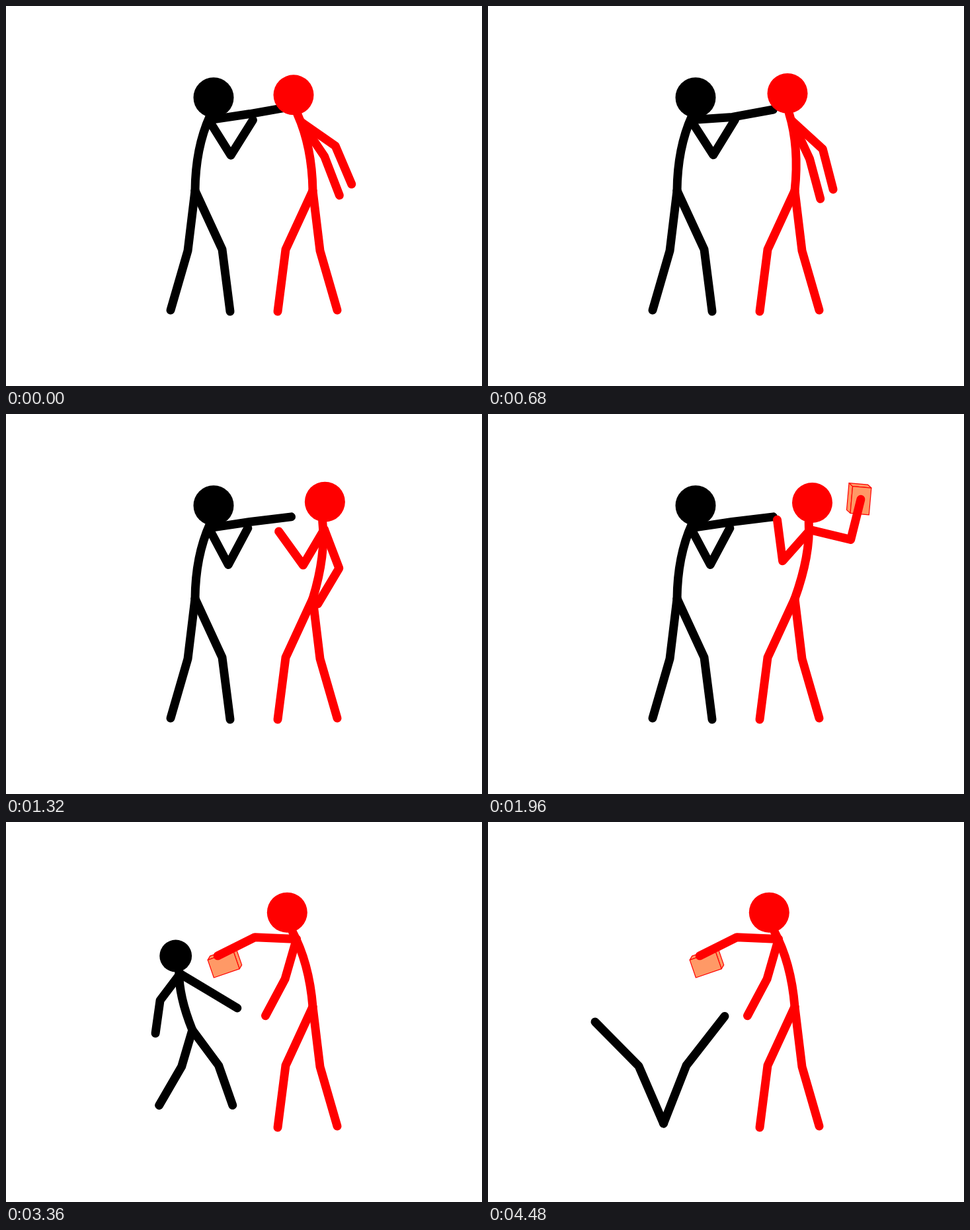
Animation, 720 px wide and 576 px high, one loop 4800 ms. Source, as an HTML page with a canvas:

```html
<!DOCTYPE html>
<html lang="en">
<head>
<meta charset="utf-8">
<title>Stick fight</title>
<style>
  html, body { margin: 0; width: 100%; height: 100%; overflow: hidden; background: #fff; }
  canvas { display: block; }
</style>
</head>
<body>
<canvas id="stage" width="720" height="576"></canvas>
<script>
const ctx = document.getElementById('stage').getContext('2d');
const LOOP = 4800, STEP = 40, PUNCH = 240, LIMB = 63;
const clamp = x => Math.min(1, Math.max(0, x));
const wave = x => (1 - Math.cos(Math.PI * x)) / 2;
const ease = (t, start, length) => wave(clamp((t - start) / length));
const lerp = (a, b, u) => a + (b - a) * u;
const mix = (a, b, u) => a.map((v, i) => lerp(v, b[i], u));
const polar = (x, y, deg, len) => {
  const a = deg * Math.PI / 180;
  return [x + len * Math.cos(a), y + len * Math.sin(a)];
};

// A pose is the lean of the head, then upper and lower angles of the two arms
const PUNCH_A = [28, -8.5, -10, 58, -58];
const PUNCH_B = [28, 62, -62, -8.5, -7];
const KNOCKED = [-31.5, 127, -262, 31, 31];
const STRUCK = [-29, 56, 69, 35, 67];
const REELING = [7, 74, 81, 50, 84];
const GUARD = [26.5, 131.6, 262.6, 75, 130];
const REACH = [...GUARD.slice(0, 3), 57, 89];
const RAISE = [...GUARD.slice(0, 3), 13.5, -76];
const STRIKE = [-38.7, 106, 118, 182.6, -206.6];

// Leg points relative to the hip: knee and foot behind, knee and foot in front
const STANCE = [[-11, 91], [-37, 181], [41, 89], [53, 183]];
const FALLEN = [[-37.5, -87], [-103.5, -154], [34.5, -88], [92.5, -162.5]];

function path(points) {
  ctx.beginPath();
  points.forEach(p => ctx.lineTo(...p));
}

function arm([x, y], upper, lower, size = 1) {
  const elbow = polar(x, y, upper, LIMB * size);
  return [[x, y], elbow, polar(...elbow, lower, LIMB * size)];
}

// facing is 1 to the right and -1 to the left; the spine bows away from that side
function makeBody(hip, facing, lean, size = 1) {
  const height = 146 - 2 * facing;
  const at = (x, y) => [hip[0] + x * size, hip[1] + y * size];
  const top = -Math.sqrt(height ** 2 - lean ** 2);
  const bend = 0.45 * lean - 12 * facing, middle = -0.45 * height;
  return {
    head: at(lean, top),
    neck: at(0.8 * lean, 0.8 * top),
    spine: at(bend, middle),
    shoulder: at(0.664 * lean + 0.16 * bend + 2, 0.664 * top + 0.16 * middle - 3 * facing)
  };
}

function drawFigure(color, hip, facing, legs, [lean, a1, a2, b1, b2], size = 1) {
  ctx.strokeStyle = ctx.fillStyle = color;
  ctx.lineWidth = 13;
  ctx.lineCap = ctx.lineJoin = 'round';
  const points = legs.map(([x, y]) => [hip[0] + x * facing, hip[1] + y]);
  for (const leg of [points.slice(0, 2), points.slice(2)]) {
    path([hip, ...leg]);
    ctx.stroke();
  }
  if (!size) return;
  const { head, neck, spine, shoulder } = makeBody(hip, facing, lean, size);
  path([neck]);
  ctx.quadraticCurveTo(...spine, ...hip);
  ctx.stroke();
  for (const limb of [arm(shoulder, a1, a2, size), arm(shoulder, b1, b2, size)]) {
    path(limb);
    ctx.stroke();
  }
  ctx.beginPath();
  ctx.arc(...head, 30.5 * size, 0, 2 * Math.PI);
  ctx.fill();
}

// The brick turns with the forearm and slips in the grip during the blow
function drawBrick([handX, handY], forearm, blow) {
  const x = handX + 9 * blow, y = handY + 2 + 11 * blow;
  const dx = lerp(-5.5, 3.5, blow), dy = lerp(-5, -6, blow);
  const angle = forearm + lerp(-9, 7.6, blow);
  const corners = [[-1, -1], [1, -1], [1, 1], [-1, 1]]
    .map(([u, v]) => polar(...polar(x, y, angle, 20.5 * u), angle + 90, 14.2 * v));
  const face = points => {
    path(points);
    ctx.closePath();
    ctx.fill();
    ctx.stroke();
  };
  ctx.fillStyle = '#f96';
  ctx.strokeStyle = '#f00';
  ctx.lineWidth = 1.2;
  corners.forEach((p, i) => {
    const q = corners[(i + 1) % 4];
    const visible = (q[0] - p[0]) * dy < (q[1] - p[1]) * dx;
    if (visible) face([p, q, [q[0] + dx, q[1] + dy], [p[0] + dx, p[1] + dy]]);
  });
  face(corners);
}

function redPose(t, blow) {
  if (t < 1200) {
    const p = t % PUNCH;
    return mix(STRUCK, REELING, wave(p < 160 ? p / 160 : (PUNCH - p) / 80));
  }
  if (t < 1680) return mix(STRUCK, GUARD, ease(t, 1200, 160));
  return t < 1960 ? REACH : mix(RAISE, STRIKE, blow);
}

function drawBlack(t, blow) {
  const fall = clamp(Math.floor((t - 3280) / 80) / 5);
  const legs = mix(STANCE.flat(), FALLEN.flat(), fall);
  const pairs = STANCE.map((_, i) => legs.slice(2 * i, 2 * i + 2));
  const twitch = t >= 4240 && t < 4480 && Math.floor(t / 80) % 2;
  if (twitch) {
    pairs[1] = [pairs[1][0] + 6, pairs[1][1] - 6];
    pairs[3] = [pairs[3][0] - 6, pairs[3][1] - 5];
  }
  const punching = mix(PUNCH_A, PUNCH_B, wave(Math.min(t, 1200) / PUNCH));
  const hip = mix([286, 280], [265.5, 457], fall);
  drawFigure('#000', hip, 1, pairs, mix(punching, KNOCKED, blow), 1 - fall);
}

function draw(t) {
  ctx.fillStyle = '#fff';
  ctx.fillRect(0, 0, 720, 576);
  const blow = ease(t, 2200, 400);
  const hip = [464, 280], pose = redPose(t, blow);
  drawBlack(t, blow);
  if (t >= 1680) {
    const { shoulder } = makeBody(hip, -1, pose[0]);
    drawBrick(arm(shoulder, pose[3], pose[4])[2], pose[4], blow);
  }
  drawFigure('#f00', hip, -1, STANCE, pose);
}

function tick() {
  const t = performance.now() % LOOP;
  draw(Math.floor(t / STEP) * STEP);
  requestAnimationFrame(tick);
}
tick();
</script>
</body>
</html>
```
